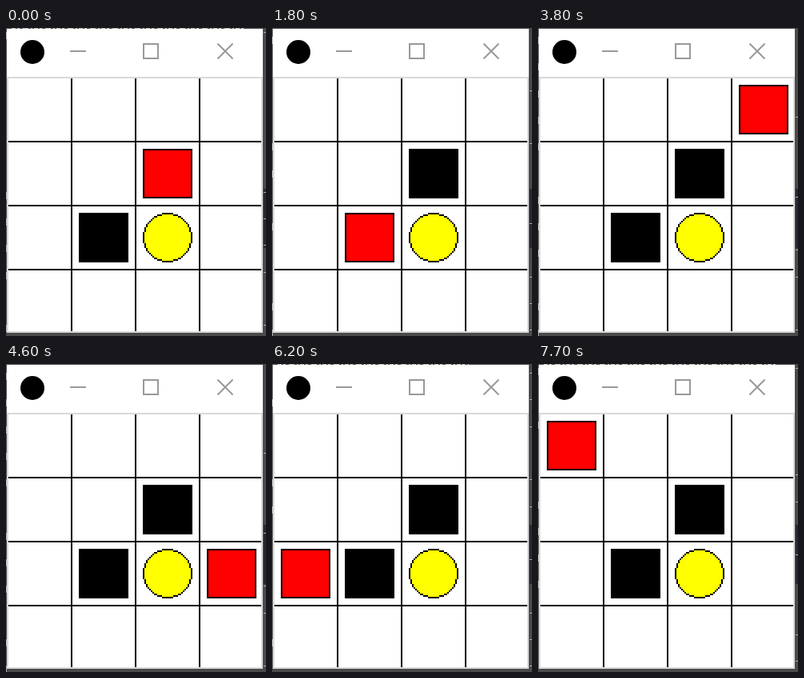
An HTML page that plays this animation: 325 px wide and 385 px high, repeating every 8 s.

```html
<!DOCTYPE html>
<html lang="en">
<head>
<meta charset="utf-8">
<title>Grid maze</title>
<style>
  html, body { margin: 0; width: 100%; height: 100%; overflow: hidden; background: #4a4a4a; }
  svg { display: block; width: 325px; height: 385px; }
  .crisp { shape-rendering: crispEdges; }
  .buttons { fill: none; stroke: #999; stroke-width: 2; }
  .grid { fill: none; stroke: #000; stroke-width: 2; }
  .cell { stroke: #000; stroke-width: 2; }
</style>
</head>
<body>
<svg viewBox="0 0 325 385">
  <rect width="325" height="385" fill="#4a4a4a"/>
  <rect class="crisp" x="322" y="201" width="3" height="74" fill="#242a35"/>
  <path id="ticks" class="crisp" stroke="#b0b0b0" fill="none"/>
  <rect class="crisp" x="1" y="1" width="320" height="380" fill="#fff"/>
  <path id="text" class="crisp" stroke="#c8c2b4" fill="none" stroke-dasharray="5 2 3 4 7 3 2 2"/>

  <circle cx="33" cy="30" r="15"/>
  <g class="buttons">
    <path class="crisp" d="M80 29H100M172 20H190V38H172Z"/>
    <path d="M264.5 19.5l19 19m0 -19l-19 19"/>
  </g>

  <rect class="crisp" x="2" y="62" width="318" height="318" fill="#fff" stroke="#d9d9d9" stroke-width="2"/>
  <path class="grid crisp" d="M82 63V379M162 63V379M242 63V379M3 142H319M3 222H319M3 302H319"/>
  <g class="cell crisp">
    <rect x="172" y="152" width="60" height="60"/>
    <rect x="92" y="232" width="60" height="60"/>
    <g transform="translate(202 262) scale(2)" stroke-width="1">
      <path id="disc" stroke="#ff0"/>
      <path id="ring"/>
    </g>
    <rect id="agent" x="12" y="72" width="60" height="60" fill="#f00"/>
  </g>
</svg>
<script>
const LOOP = 8000;
const STEP = 100;
const CELL = 80;
const LINE = 33.3;
const $ = id => document.getElementById(id);

const dirs = { U: [0, -1], D: [0, 1], L: [-1, 0], R: [1, 0] };
const clamp = n => Math.max(0, Math.min(3, n));

// One move per step; a move into a wall leaves the agent in place.
// rest: steps until the next episode, top: length of the text line above
const episodes = [
  { from: [2, 1], walk: '', rest: 1, top: 300 },
  { walk: 'DRD', rest: 6, top: 0 },
  { walk: 'UUDLLDLR', rest: 6, top: 0 },
  { walk: 'DUUURUURLLRRURULUURDDRL', rest: 5, top: 0 },
  { walk: 'RRLDUUULDDDDDRRRRRUL', rest: 5, top: 246 },
  { walk: '', rest: 3, top: 300 }
];

// every step of the loop: where the agent is, and in which episode
const steps = episodes.flatMap(({ from = [0, 0], walk, rest }, episode) => {
  let [col, row] = from;
  const path = [{ col, row, episode }];
  for (const key of walk) {
    col = clamp(col + dirs[key][0]);
    row = clamp(row + dirs[key][1]);
    path.push({ col, row, episode });
  }
  return path.concat(Array(rest - 1).fill(path.at(-1)));
});

function random(seed) {
  const n = Math.sin(seed * 127.1) * 43758.5453;
  return n - Math.floor(n);
}

// text lines of the page behind, seen at the sides of the window
function sideTicks(seed, y) {
  let d = '';
  for (let i = 1; y < 385; y += LINE, i++) {
    if (random(seed * 20 + i) < 0.5) d += `M322 ${Math.round(y)}.5h3`;
    if (random(seed * 50 + i) < 0.5) d += `M.5 ${Math.round(y)}v9`;
  }
  return d;
}

// round goal in double-size pixels
function drawGoal(r) {
  const dot = (x, y) => `M${x - 0.5} ${y}h1`;
  let disc = '', ring = '';
  for (let i = -r; i <= r; i++) {
    const w = Math.round(Math.sqrt(r * r - i * i));
    disc += `M${-w} ${i}H${w}`;
    ring += dot(i, w) + dot(i, -w) + dot(w, i) + dot(-w, i);
  }
  $('disc').setAttribute('d', disc);
  $('ring').setAttribute('d', ring);
}

function draw(t) {
  const { col, row, episode } = steps[Math.floor(t / STEP)];
  const { top } = episodes[episode];
  $('agent').setAttribute('transform', `translate(${col * CELL} ${row * CELL})`);
  $('ticks').setAttribute('d', sideTicks(episode, top === 300 ? 5 : 11));
  $('text').setAttribute('d', top ? `M7 .5H${top}` : '');
}

drawGoal(15);
const start = performance.now();
function frame() {
  draw((performance.now() - start) % LOOP);
  requestAnimationFrame(frame);
}
frame();
</script>
</body>
</html>
```
